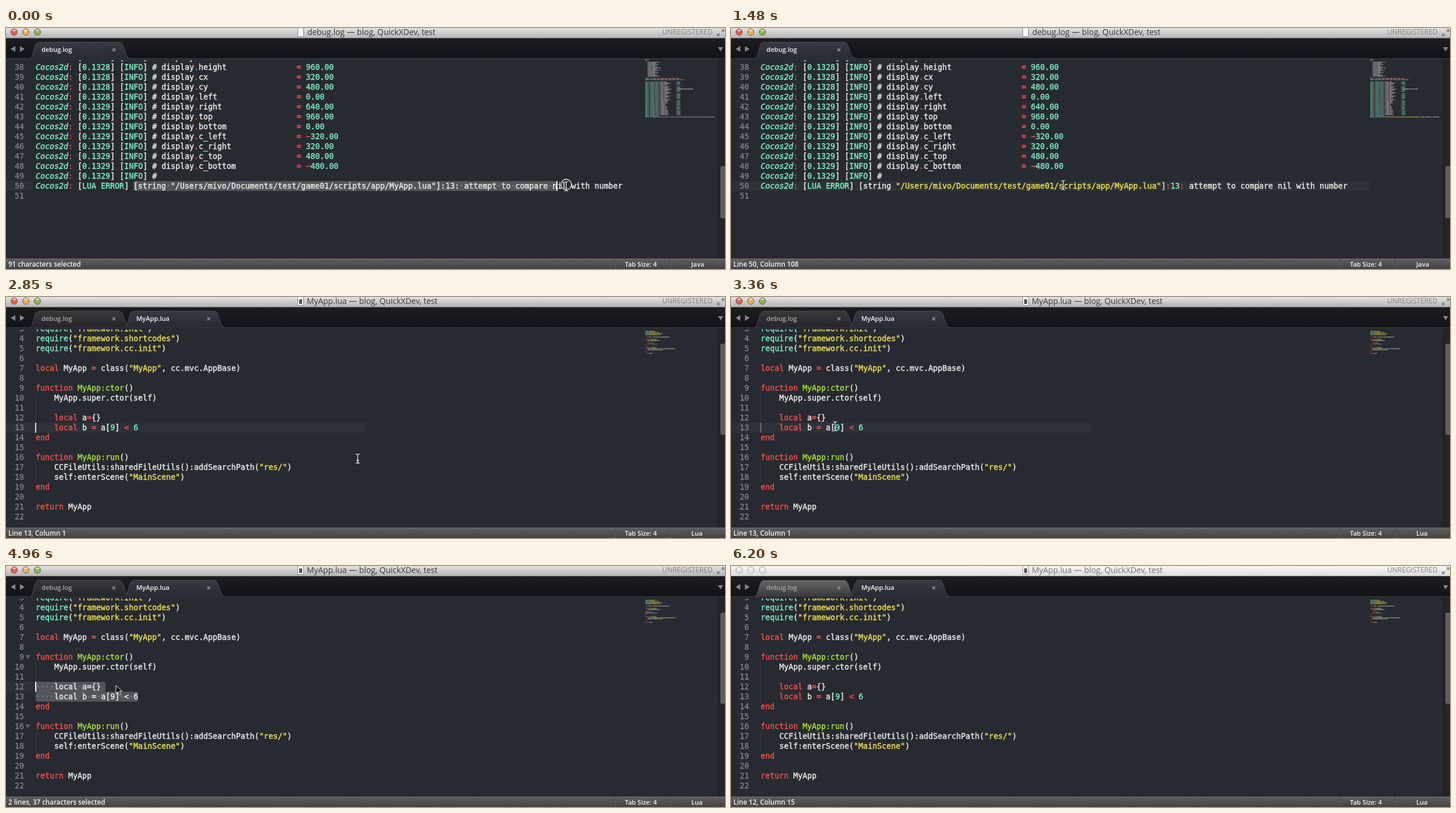
An HTML page with a canvas for the animation above (6.26 s loop, 1236 px wide and 414 px high).

```html
<!DOCTYPE html>
<html lang="en">
<head>
<meta charset="utf-8">
<title>Jump to error line</title>
<style>
html, body { margin: 0; width: 100%; height: 100%; overflow: hidden; background: #282a32; }
#stage { position: absolute; left: 0; top: 0; width: 1236px; height: 414px; overflow: hidden; background: #282a32; }
#stage > *, .pane > *, #marks > *, #pairs > * { position: absolute; }
svg { left: 0; top: 0; }
pre, .sel { margin: 0; white-space: pre; font: 13.31px/17px "DejaVu Sans Mono", monospace; color: #e8e9e4; -webkit-text-stroke: .45px; }
.pane { left: 0; top: 0; }
.nums { left: 0; width: 31px; text-align: right; color: #85878b; -webkit-text-stroke: .25px; }
.code { left: 51px; }
.c { color: #7bedc2; font-style: italic; }
.n, .a { color: #7bedc2; }
.k { color: #ee5048; }
.s { color: #ebe048; }
.g { color: #a6e22e; }
.row { height: 17px; background: #2e3138; }
.sel { height: 17px; overflow: hidden; background: #53555a; border-radius: 3px; }
.sel i { color: #85878b; font-style: normal; }
#caret { width: 1.5px; height: 17px; background: #f8f8f2; }
.under { top: 280px; width: 8px; height: 1px; background: #f0f0ec; }
.guide { left: 51px; width: 1px; background: repeating-linear-gradient(#5a5d64 0 1px, transparent 1px 3px); }
#quote { left: 0; top: 264px; font: bold 17px/20px "Liberation Serif", serif; color: #f0f0ec; }
#map { left: 1099px; top: 52px; }
.track { left: 1224px; top: 53px; width: 11px; height: 343px; background: #222429; border-left: 1px solid #17181b; }
#thumb { left: 1228px; width: 9px; border-radius: 4px; background: #5d5f62; }
.ui { font: 600 11.1px "Open Sans", sans-serif; }
.title { font: 13.9px "Open Sans", sans-serif; }
.bar { left: 0; top: 396px; width: 1236px; height: 18px; background: linear-gradient(#606060, #434343); box-shadow: inset 0 1px #6c6c6c; color: #f4f4f4; }
.bar span { position: absolute; top: 2px; line-height: 16px; white-space: nowrap; }
.bar b { position: absolute; top: 0; width: 1px; height: 18px; background: #414141; box-shadow: 1px 0 #636363; }
#status { left: 4px; font-size: 11.6px; }
</style>
</head>
<body>
<div id="stage">
  <div class="row" id="gutterRow" style="left:0;width:46px"></div>
  <div class="row" id="lineRow" style="left:46px"></div>
  <div class="pane" id="logPane"></div>
  <div class="pane" id="luaPane">
    <div class="guide" style="top:165px;height:68px"></div>
    <div class="guide" style="top:284px;height:34px"></div>
  </div>
  <div id="marks"></div>
  <div id="pairs"></div>
  <div id="quote">“”</div>
  <div id="caret"></div>

  <svg width="1236" height="414">
    <defs>
      <linearGradient id="strip" x2="0" y2="1"><stop stop-color="#1d1e21"/><stop offset="1" stop-color="#121317"/></linearGradient>
      <linearGradient id="front" x2="0" y2="1"><stop stop-color="#373a42"/><stop offset="1" stop-color="#282a32"/></linearGradient>
      <linearGradient id="back" x2="0" y2="1"><stop stop-color="#38393b"/><stop offset="1" stop-color="#242528"/></linearGradient>
      <linearGradient id="hover" x2="0" y2="1"><stop stop-color="#666764"/><stop offset="1" stop-color="#38393b"/></linearGradient>
      <linearGradient id="live" x2="0" y2="1"><stop stop-color="#e2e2e2"/><stop offset="1" stop-color="#b5b5b5"/></linearGradient>
      <linearGradient id="idle" x2="0" y2="1"><stop stop-color="#f5f5f5"/><stop offset="1" stop-color="#dcdcdc"/></linearGradient>
    </defs>
    <rect y="53" width="1236" height="2.500" fill="#282a32"/>
    <rect y="17" width="1236" height="35" fill="url(#strip)"/>
    <rect y="52" width="1236" height="1" fill="#3b3e45"/>
    <rect id="titleBar" width="1236" height="17"/>
    <rect y="17" width="1236" height="1" fill="#5a5a5a"/>
    <g id="lights" stroke-width="1"></g>
    <path d="M501.500-1h7l3 3v12.500h-10z" fill="#fafafa" stroke="#888"/>
    <path id="docInk" d="M504 4h5v8h-5z" fill="#555"/>
    <text id="title" class="title" y="12"></text>
    <text class="title" x="1128" y="11" style="font-size:12px" fill="#808080">UNREGISTERED</text>
    <path d="M1223 13l4-4m-4 0v4h4M1234 3l-4 4m4 0v-4h-4" fill="none" stroke="#777" stroke-width="1.400"/>
    <path d="M16 31v10l-8-5zM24 31v10l8-5zM1224 33h9l-4.500 7z" fill="#85868a"/>
    <g id="tabs"></g>
    <path id="folds" d="M33 153h9l-4.500 7zM33 272h9l-4.500 7z" fill="#5c5f66"/>
  </svg>

  <canvas id="map" width="124" height="106"></canvas>
  <div class="track"></div>
  <div id="thumb"></div>

  <div class="bar ui">
    <span id="status"></span>
    <b style="left:1046px"></b><span style="left:1064px">Tab Size: 4</span>
    <b style="left:1141px"></b><span id="lang" style="left:1178px"></span>
  </div>

  <svg width="1236" height="414">
    <g id="mouse">
      <circle id="press" cy="-3" r="9" fill="none" stroke="#f2f2f2" stroke-width="1.300"/>
      <g id="beam" fill="none" stroke-linecap="round">
        <path d="M-3-8q3 0 3 3v10q0 3-3 3M3-8q-3 0-3 3v10q0 3 3 3M-2 3h4" stroke="#222" stroke-width="2.600"/>
        <path d="M-3-8q3 0 3 3v10q0 3-3 3M3-8q-3 0-3 3v10q0 3 3 3M-2 3h4" stroke="#f5f5f5" stroke-width="1.200"/>
      </g>
      <path id="arrow" d="M0 0v14l3.400-3 2.400 5.500 2.500-1.100-2.400-5.300h4.700z" fill="#111" stroke="#f5f5f5"/>
    </g>
  </svg>
</div>

<script>
const LOOP = 6260, CELL = 8, ROW = 17, LEFT = 51;
const OPEN = 2640, IDLE = 6080, LAG = 50;
const $ = id => document.getElementById(id);
const show = (id, on) => { $(id).style.display = on ? '' : 'none'; };

// ---- documents ----
const entry = (time, name, value) =>
  `Cocos2d: [${time}] [INFO] # ${name}`.padEnd(56) + (value ? `= ${value}` : '');

function logLines() {
  const out = ['Cocos2d', '{'];
  for (let i = 2; i < 15; i++) out.push('    ' + 'gl_max_texture_units true'.slice(0, 13 + (i * 5) % 12));
  out.push('}', 'Cocos2d: [LUA] ' + 'load=.:'.repeat(7), 'Cocos2d: [LUA] ' + 'init=.:'.repeat(8), '');
  for (let i = 19; i < 36; i++) {
    out.push(entry('0.1327', 'device.' + 'informationlist'.slice(0, 4 + (i * 7) % 11),
      i == 25 ? '/data/app/files/cache/res/main' : i % 6 == 4 ? '' : '640.00'));
  }
  const values = { width: '640.00', height: '960.00', cx: '320.00', cy: '480.00', left: '0.00', right: '640.00',
    top: '960.00', bottom: '0.00', c_left: '−320.00', c_right: '320.00', c_top: '480.00', c_bottom: '−480.00' };
  Object.keys(values).forEach((k, i) => out.push(entry(i < 5 ? '0.1328' : '0.1329', 'display.' + k, values[k])));
  out.push(entry('0.1329', ''));
  out.push('Cocos2d: [LUA ERROR] [string "/Users/mivo/Documents/test/game01/scripts/app/MyApp.lua"]:13: attempt to compare nil with number', '');
  return out;
}

const luaLines = `
require("config")
require("framework.init")
require("framework.shortcodes")
require("framework.cc.init")

local MyApp = class("MyApp", cc.mvc.AppBase)

function MyApp:ctor()
    MyApp.super.ctor(self)
${' '.repeat(4)}
    local a={}
    local b = a[9] < 6
end

function MyApp:run()
    CCFileUtils:sharedFileUtils():addSearchPath("res/")
    self:enterScene("MainScene")
end

return MyApp
`.split('\n');

const log = {
  lines: logLines(), first: 36, top: 263 - 49 * ROW, mapTop: 2, right: 1099, thumb: [237, 90], lang: 'Java', title: 'debug.log', titleX: 518,
  rule: /(?<c>^Cocos2d)|(?<s>"[^"]*")|(?<n>\b\d+(?:\.\d+)?\b|\bINFO\b|\bLUA(?: ERROR)?\b)|(?<k>[:.=−])/g
};
const lua = {
  lines: luaLines, first: 2, top: 216 - 12 * ROW, mapTop: 4, right: 618, thumb: [80, 157], lang: 'Lua', title: 'MyApp.lua', titleX: 517,
  rule: /(?<s>"[^"]*")|(?<k>\b(?:local|function|end|return)\b|[=<])|(?<a>\brequire\b)|(?<n>\b\d+\b)|(?<g>MyApp:\w+)/g
};

function tokens(text, rule) {
  const out = [];
  let at = 0;
  for (const m of text.matchAll(rule)) {
    if (m.index > at) out.push(['', text.slice(at, m.index)]);
    out.push([Object.keys(m.groups).find(k => m.groups[k] !== undefined), m[0]]);
    at = m.index + m[0].length;
  }
  out.push(['', text.slice(at)]);
  return out;
}

const esc = s => s.replace(/&/g, '&amp;').replace(/</g, '&lt;');

function fillPane(id, doc) {
  const rows = doc.lines.slice(doc.first);
  const y = doc.top + doc.first * ROW;
  const nums = rows.map((_, i) => doc.first + i + 1).join('\n');
  const code = rows.map(r => tokens(r, doc.rule).map(([c, s]) => `<span class="${c}">${esc(s)}</span>`).join('')).join('\n');
  $(id).insertAdjacentHTML('beforeend',
    `<pre class="nums" style="top:${y}px">${nums}</pre><pre class="code" style="top:${y}px">${code}</pre>`);
}
fillPane('logPane', log);
fillPane('luaPane', lua);
$('pairs').innerHTML = [21, 29, 85, 86].map(c => `<div class="under" style="left:${LEFT + c * CELL}px"></div>`).join('');

// ---- minimap ----
const ink = { '': '#c8c9c5', c: '#6fd0ac', n: '#6fd0ac', a: '#6fd0ac', k: '#d84a44', s: '#cfc540', g: '#98cc30' };
function drawMap(doc, from, to) {
  const g = $('map').getContext('2d');
  g.clearRect(0, 0, 124, 106);
  doc.lines.forEach((line, r) => {
    let col = 0;
    const y = doc.mapTop + r * 2;
    for (const [cls, text] of tokens(line, doc.rule)) for (const ch of text) {
      const picked = from && (r > from.r || r == from.r && col >= from.c) && (r < to.r || r == to.r && col < to.c);
      g.globalAlpha = picked ? .75 : .48 + (ch.charCodeAt(0) * 7 % 5) * .07;
      g.fillStyle = picked ? '#8b8d90' : ink[cls];
      if (ch != ' ' || picked) g.fillRect(col * .94, y, .94, 1.5);
      col++;
    }
  });
}

// ---- window chrome ----
const tabPath = x => `M${x} 52.500C${x + 9} 52 ${x + 6} 24.500 ${x + 17} 24.500H${x + 154}C${x + 165} 24.500 ${x + 163} 52 ${x + 174} 52.500`;
const tab = (x, name, fill, color) =>
  `<path d="${tabPath(x)}" fill="url(#${fill})" stroke="#4b4e55"/>
   <text class="ui" x="${x + 21}" y="41" fill="${color}">${name}</text>
   <path d="M${x + 143} 35l5 5m0-5l-5 5" stroke="#9a9b9d" stroke-width="1.300"/>`;

function drawChrome(doc, idle, hover) {
  const front = tab(doc == log ? 40 : 203, doc.title, 'front', '#f4f4f4');
  $('tabs').innerHTML = doc == log ? front : tab(40, 'debug.log', hover ? 'hover' : 'back', '#a9aaac') + front;
  $('lights').innerHTML = ['#e65d52', '#e8b44a', '#86b94f'].map((c, i) =>
    `<circle cx="${14 + 20 * i}" cy="7" r="5.500" fill="${idle ? '#e6e6e6' : c}" stroke="${idle ? '#a2a2a2' : '#6e5a4c'}"/>
     <ellipse cx="${14 + 20 * i}" cy="4" rx="3" ry="1.700" fill="#fff" opacity=".6"/>`).join('');
  $('titleBar').setAttribute('fill', `url(#${idle ? 'idle' : 'live'})`);
  $('title').textContent = `${doc.title} — blog, QuickXDev, test`;
  $('title').setAttribute('x', doc.titleX);
  $('title').setAttribute('fill', idle ? '#777' : '#3a3a3a');
  show('docInk', doc == lua);
  show('logPane', doc == log);
  show('luaPane', doc == lua);
  $('lang').textContent = doc.lang;
  $('thumb').style.top = doc.thumb[0] + 'px';
  $('thumb').style.height = doc.thumb[1] + 'px';
}

// ---- pointer: time, x, y ----
const path = [
  [-50, 947, 271], [0, 963, 272], [380, 1062, 271], [600, 1062, 271], [740, 909, 270], [860, 907, 270],
  [1240, 640, 272], [1480, 571, 270], [1680, 548, 265], [1890, 568, 272], [2060, 572, 272], [2240, 586, 273],
  [2520, 604, 277], [3060, 605, 278], [3360, 179, 222], [3500, 190, 222], [3710, 231, 224], [3790, 231, 224],
  [3980, 158, 219], [4120, 108, 207], [4230, 75, 195], [4280, 60, 199], [4390, 48, 204], [4480, 45, 207],
  [4600, 32, 208], [4700, 40, 208], [4960, 189, 205], [5150, 176, 207], [5300, 175, 207], [5600, 166, 170],
  [5950, 112, 38], [6110, 100, 4], [6170, 98, -24]
];
function pointer(t) {
  const i = path.findIndex(p => p[0] > t);
  if (i < 0) return path[path.length - 1].slice(1);
  if (!i) return path[0].slice(1);
  const [a, b] = [path[i - 1], path[i]], k = (t - a[0]) / (b[0] - a[0]);
  return [a[1] + (b[1] - a[1]) * k, a[2] + (b[2] - a[2]) * k];
}

const clamp = (v, lo, hi) => Math.min(hi, Math.max(lo, v));
const within = (t, a, b) => t >= a && t < b;

function cellAt(doc, [x, y]) {
  const r = clamp(Math.floor((y - doc.top) / ROW), 0, doc.lines.length - 1);
  return { r, c: clamp(Math.round((x - LEFT) / CELL), 0, doc.lines[r].length) };
}

// Cursor and selection anchor at time t
function editing(t) {
  if (t < 740) return { anchor: { r: 49, c: 21 }, head: cellAt(log, pointer(Math.min(t, 430) - LAG)) };
  if (t < 1950) return { head: { r: 49, c: 107 } };
  if (t < OPEN) return { head: { r: 49, c: 65 } };
  if (t < 3780) return { head: { r: 12, c: 0 } };
  if (t < 5200) return { anchor: { r: 12, c: 22 }, head: cellAt(lua, pointer(Math.min(t, 4530) - LAG)) };
  return { head: { r: 11, c: 14 } };
}

const offset = (doc, p) => doc.lines.slice(0, p.r).reduce((n, l) => n + l.length + 1, p.c);

function drawSelection(doc, from, to) {
  let html = '';
  if (from) for (let r = from.r; r <= to.r; r++) {
    const a = r == from.r ? from.c : 0, last = r == to.r;
    const text = doc.lines[r].slice(a, last ? to.c : undefined);
    html += `<div class="sel" style="left:${LEFT + a * CELL}px;top:${doc.top + r * ROW}px;width:${(text.length + !last) * CELL}px">` +
      esc(text).replace(/ /g, '<i>·</i>') + '</div>';
  }
  $('marks').innerHTML = html;
}

let editKey, chromeKey;
function render(t) {
  const doc = t < OPEN ? log : lua, idle = t >= IDLE;
  const hover = t >= 5920;
  const { anchor, head } = editing(t);
  const count = anchor ? Math.abs(offset(doc, head) - offset(doc, anchor)) : 0;

  const ck = [doc.title, idle, hover].join();
  if (ck != chromeKey) { chromeKey = ck; drawChrome(doc, idle, hover); }

  const ek = [doc.title, head.r, head.c, count, idle].join();
  if (ek != editKey) {
    editKey = ek;
    let from, to;
    if (count) [from, to] = offset(doc, head) < offset(doc, anchor) ? [head, anchor] : [anchor, head];
    drawSelection(doc, from, to);
    drawMap(doc, from, to);
    const rows = count ? to.r - from.r + 1 : 0;
    $('status').textContent = count
      ? (rows > 1 ? `${rows} lines, ` : '') + `${count} characters selected`
      : `Line ${head.r + 1}, Column ${head.c + 1}`;
    const y = doc.top + head.r * ROW + 'px';
    for (const id of ['gutterRow', 'lineRow', 'caret']) $(id).style.top = y;
    $('lineRow').style.width = doc.right - 46 + 'px';
    $('caret').style.left = LEFT - 1 + head.c * CELL + 'px';
    show('gutterRow', !idle);
    show('lineRow', !idle && !count);
    show('caret', !idle);
  }

  // Caret fades in and out, restarting at each edit
  const since = t - [0, 740, 1950, OPEN, 3780, 5200].filter(s => s <= t).pop();
  const solid = t < 400 || within(t, 3780, 4960);
  $('caret').style.opacity = solid ? 1 : clamp(.6 + .8 * Math.cos(2 * Math.PI * since / 1060), 0, 1);

  const matched = within(t, 1950, OPEN);
  show('pairs', matched);
  show('quote', matched);
  $('folds').style.opacity = clamp((t - 4540) / 120, 0, 1) * clamp((5180 - t) / 180, 0, 1);

  const [x, y] = pointer(t);
  const arrow = within(t, 4480, 5060) || y < 53;
  $('mouse').setAttribute('transform', `translate(${x.toFixed(1)} ${y.toFixed(1)})`);
  show('beam', !arrow);
  show('arrow', arrow);
  show('press', t < 400 || within(t, 720, 840) || within(t, 1930, 2060) || within(t, 2520, 2780) ||
    within(t, 3770, 4480) || within(t, 5180, 5300));
}

let start;
function tick(now) {
  start ??= now;
  render((now - start) % LOOP);
  requestAnimationFrame(tick);
}
render(0);
requestAnimationFrame(tick);
</script>
</body>
</html>
```
